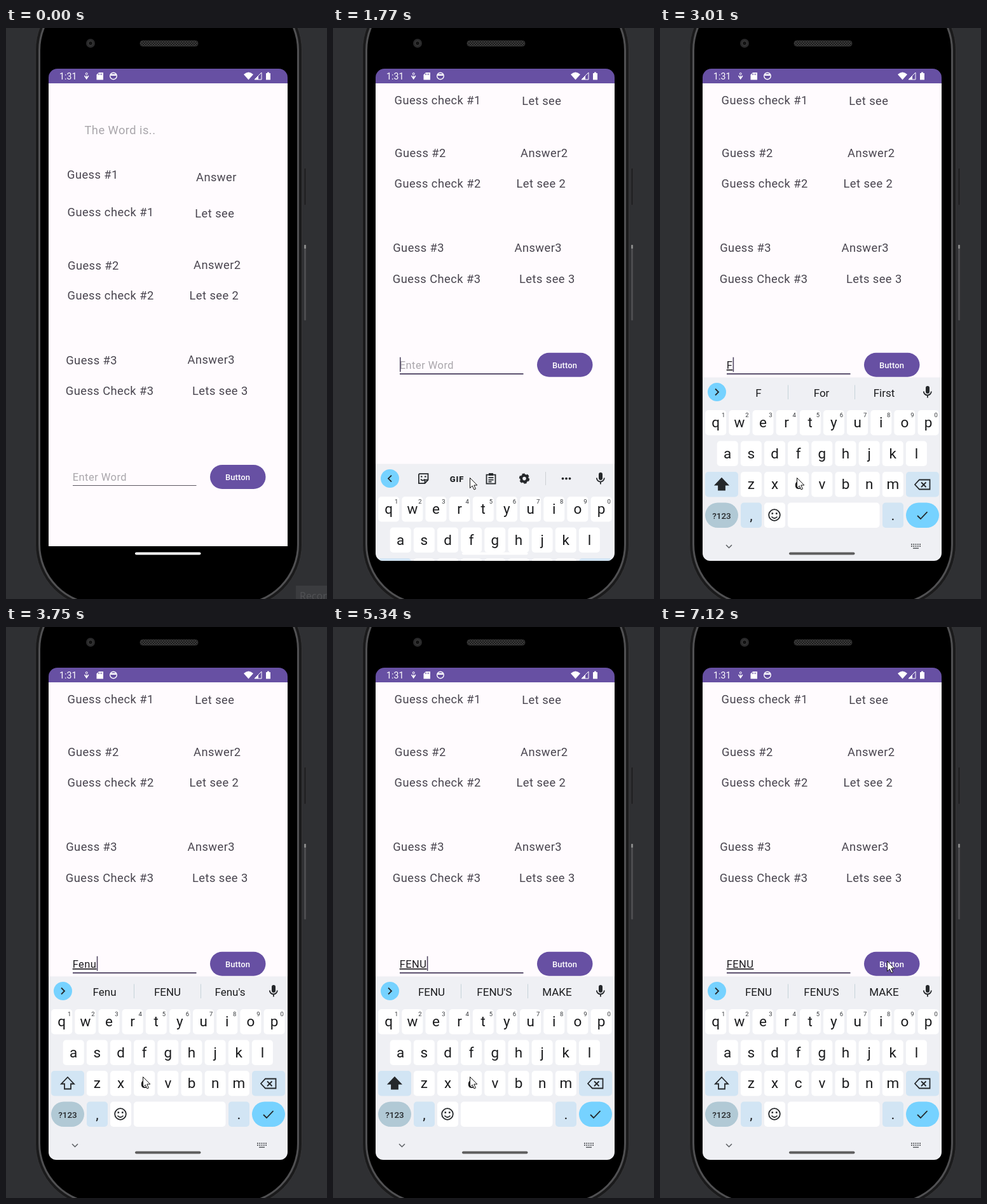
An HTML page for the animation above (8000 ms loop, 505x898 px).

```html
<!DOCTYPE html>
<html lang="en">
<head>
<meta charset="utf-8">
<title>Word guess app</title>
<style>
  html, body { margin: 0; width: 100%; height: 100%; overflow: hidden; background: #2f3033; }
  svg { display: block; width: 100%; height: 100%; }
  text { font-family: Roboto, sans-serif; white-space: pre; }
  .label { font-size: 18.3px; letter-spacing: .457px; fill: #49454f; }
  .field { font-size: 16.5px; letter-spacing: .457px; fill: #1c1b1f; }
  .label.hint, .field.hint { fill: #a9a6ab; }
  .key { font-size: 22.5px; fill: #1b1c1e; text-anchor: middle; }
  .digit { font-size: 9.5px; fill: #33363a; text-anchor: middle; }
  .word { font-size: 17px; fill: #1b1c1e; text-anchor: middle; }
  .line { fill: none; stroke: #25282b; stroke-width: 1.8; }
</style>
</head>
<body>
<svg viewBox="0 0 505 898">
  <defs>
    <clipPath id="screen"><path d="M67 78a14 14 0 0 1 14-14H429a14 14 0 0 1 14 14V826a12 12 0 0 1-12 12H79a12 12 0 0 1-12-12Z"/></clipPath>
    <clipPath id="page"><path d="M67 87H443V815H67Z"/></clipPath>
    <pattern id="mesh" width="4" height="4" patternUnits="userSpaceOnUse">
      <path d="M0 0L4 4M4 0L0 4" stroke="#444" stroke-width=".8"/>
    </pattern>
  </defs>

  <g id="tooltip">
    <path d="M456 877H505V898H456Z" fill="#3b3c3f"/>
    <text x="462" y="899" style="font:16px 'Open Sans',sans-serif" fill="#515255">Record</text>
  </g>

  <g id="phone">
    <rect x="468.500" y="220" width="4" height="59" rx="2" fill="#232325" stroke="#39393b" stroke-width=".7"/>
    <rect x="469" y="341" width="3" height="119" rx="1.500" fill="#4c4c4f"/>
    <rect x="469" y="341" width="3" height="6" rx="1" fill="#888"/>
    <rect x="46.500" y="-65" width="419" height="977" rx="100" fill="#1a1a1b" stroke="#353537"/>
    <rect x="52.500" y="-59" width="407" height="965" rx="94" fill="#000" stroke="#505052" stroke-width="3"/>
    <circle cx="133" cy="24" r="7" fill="#29292a"/>
    <circle cx="133" cy="24" r="3.5" fill="#111" stroke="#444"/>
    <rect x="211" y="20" width="91" height="8.5" rx="4" fill="#1b1b1b"/>
    <rect x="211" y="20" width="91" height="8.5" rx="4" fill="url(#mesh)" stroke="#333"/>
  </g>

  <g clip-path="url(#screen)">
    <path d="M67 87H443V815H67Z" fill="#fffbfe"/>
    <g clip-path="url(#page)">
      <g id="content">
        <g id="labels"></g>
        <path id="underline"/>
        <text id="entry" class="field" x="104.700" y="712.300"></text>
        <path id="caret" d="M0 694V717" stroke="#514863" stroke-width="1.6"/>
        <rect x="321" y="687" width="87.5" height="38" rx="19" fill="#6750a3"/>
        <text x="364.5" y="711" text-anchor="middle" font-size="13" font-weight="500" letter-spacing=".1" fill="#fff">Button</text>
      </g>
    </g>
    <path d="M67 64H443V87H67Z" fill="#6750a3"/>
    <g fill="#fff">
      <text x="84" y="81" font-size="14.2">1:31</text>
      <path d="M142.5 73.5L146 70H153V81.500H142.500Z"/>
      <path d="M145.500 71.500v2.500M148 71.500v2.500M150.500 71.500v2.500" stroke="#6750a3"/>
      <circle cx="169" cy="75.500" r="5.300" fill="none" stroke="#fff" stroke-width="1.400"/>
      <path d="M164.500 72.500h9v2.500h-9z"/>
      <path d="M123.500 75l3.200 5 3.200-5M126.700 75v4" fill="none" stroke="#fff" stroke-width="1.400"/>
      <circle cx="126.700" cy="72" r="1.500" fill="none" stroke="#fff"/>
      <path d="M374 73q7.500-7 15 0L381.500 81.500Z"/>
      <path d="M391 81L402 70V81Z" fill="none" stroke="#fff"/><path d="M391 81L397 75V81Z"/>
      <path d="M409 71h2v-1.500h3V71h2V81.500h-7Z"/>
    </g>

    <g id="keyboard">
      <path d="M67 549.5H443V840H67Z" fill="#eff0f4"/>
      <g id="keys"></g>
      <path id="shift" class="line" d="M97 708L107 718.500H102V726.500H92V718.500H87Z"/>
      <path class="line" d="M401 718L408 710.500H424.500V725.500H408ZM411 714.500l7.500 7.500M418.500 714.500l-7.500 7.500"/>
      <g class="line"><circle cx="180" cy="766" r="8.800"/><path d="M175.500 768.500q4.500 5 9 0"/></g>
      <path d="M175.500 763.500h2.600M182 763.500h2.600" stroke="#25282b" stroke-width="2.600"/>
      <path class="line" d="M405 767l5 5 10.500-11"/>
      <circle cx="89.500" cy="572.500" r="14.500" fill="#76d2ff"/>
      <path id="chevron" class="line" d="M92 567.500l-5 5 5 5"/>
      <rect x="418" y="563" width="6" height="12" rx="3" fill="#25282b"/>
      <path class="line" d="M414.800 571.500a6 6 0 0 0 12 0M420.900 577.500V581.500"/>

      <g id="toolbar">
        <path class="line" d="M136 565H149.500V574.500L144.500 580H135V566ZM149.500 574.500H144.500V580M138 573.500q3.500 4 6.500 0"/>
        <path d="M138 568.500h2.500v2h-2.500zM144 568.500h2.500v2h-2.500z" fill="#25282b"/>
        <text x="195" y="577.500" text-anchor="middle" font-size="13" font-weight="900" letter-spacing=".8" fill="#25282b">GIF</text>
        <path class="line" d="M241.500 566.500H255.500V580.500H241.500ZM244.500 571h8M244.500 574.500h8M244.500 577.500h5"/>
        <path d="M245 564h7v4h-7z" fill="#25282b"/>
        <circle cx="301" cy="572.500" r="4.800" fill="none" stroke="#25282b" stroke-width="4"/>
        <circle cx="301" cy="572.500" r="7" fill="none" stroke="#25282b" stroke-width="2.400" stroke-dasharray="4.200 3.130"/>
        <path d="M334.500 562V583" stroke="#cdd0d4"/>
        <path d="M361.500 572.500h.01M367 572.500h.01M372.500 572.500h.01" stroke="#25282b" stroke-width="3.800" stroke-linecap="round"/>
      </g>
      <g id="suggestions">
        <path d="M201.500 561.500V584M306.500 561.500V584" stroke="#c6d3d9"/>
        <text class="word" x="155" y="579.500"></text>
        <text class="word" x="254" y="579.500"></text>
        <text class="word" x="352.500" y="579.500"></text>
      </g>
      <path d="M104 813l4.500 4.500 4.500-4.500" fill="none" stroke="#5d6064" stroke-width="1.500"/>
      <path d="M395 812H410M395 815H410" stroke="#5d6064" stroke-width="1.800" stroke-dasharray="1.800 1.500"/>
      <path d="M398 818.300H407" stroke="#5d6064" stroke-width="1.500"/>
    </g>
    <rect id="handle" x="203" y="824.500" width="103.500" height="4" rx="2"/>
  </g>
  <path id="pointer" d="M.5 .5V16.500L4.200 13 7 19 9.500 17.900 6.800 12H11.800Z" fill="#fff" stroke="#111" stroke-linejoin="round"/>
</svg>

<script>
const LOOP = 8000;
const $ = id => document.getElementById(id);
const entry = $('entry');
const words = document.querySelectorAll('.word');

const LABELS = [
  ['The Word is..', 123.5, 166.5, 'hint'],
  ['Guess #1', 96, 236.5], ['Answer', 299, 241],
  ['Guess check #1', 96.5, 296], ['Let see', 297.3, 297.5],
  ['Guess #2', 97, 379.5], ['Answer2', 295, 379],
  ['Guess check #2', 96.5, 427], ['Let see 2', 288.5, 427],
  ['Guess #3', 94.2, 528.5], ['Answer3', 285.5, 528],
  ['Guess Check #3', 93.8, 577], ['Lets see 3', 293, 577],
];
$('labels').innerHTML = LABELS.map(([s, x, y, c = '']) =>
  `<text class="label ${c}" x="${x}" y="${y}">${s}</text>`).join('');

const key = (x, y, w, fill = '#fff', r = 5) =>
  `<rect x="${x}" y="${y}" width="${w}" height="39.5" rx="${r}" fill="${fill}"/>`;
const glyph = (s, x, y, cls = 'key') => `<text class="${cls}" x="${x}" y="${y}">${s}</text>`;
const PITCH = 37.15, BLUE = '#d2e5f4';
const letters = [['qwertyuiop', 87.7, 601], ['asdfghjkl', 106.2, 649.5], ['zxcvbnm', 143.4, 698]]
  .map(([row, x0, y], r) => [...row].map((c, i) => {
    const x = x0 + i * PITCH;
    return key(x - 16.5, y, 33) + glyph(c, x, y + 27) +
      (r ? '' : glyph((i + 1) % 10, x + 12, y + 11, 'digit'));
  }).join('')).join('');
$('keys').innerHTML = letters +
  key(71, 698, 52, BLUE) + key(387, 698, 52, BLUE) +
  key(71, 746.5, 52, '#b1c9d5', 19.75) + key(127, 746.5, 33, BLUE) + key(164, 746.5, 33) +
  key(201, 746.5, 144.5) + key(350, 746.5, 33, BLUE) + key(387, 746.5, 52, '#76d2ff', 19.75) +
  '<text x="97" y="772" text-anchor="middle" font-size="13.5" font-weight="500" fill="#25282b">?123</text>' +
  glyph(',', 143.5, 774) + glyph('.', 366.5, 774);

// time, typed text, suggestions
const TYPING = [
  [0, ''],
  [3010, 'F', 'F For First'], [3280, 'Fe', 'Fe Feel Few'],
  [3490, 'Fen', 'Fen Fence Fend'], [3550, 'Fenu', 'Fen Fence Fend'],
  [3750, 'Fenu', "Fenu FENU Fenu's"],
  [4250, 'Fen', 'Fen Fence Fend'], [4320, 'Fe', 'Fe Feel Few'],
  [4390, 'F', 'F For First'], [4460, ''],
  [5000, 'F', 'F FOR FIRST'], [5130, 'FE', 'FE FEEL FEW'],
  [5260, 'FEN', 'FEN FENCE FEND'], [5340, 'FENU', "FENU FENU'S MAKE"],
];
const CARET_ON = [[1370, 1970], [2520, 4080], [4180, 4950], [5000, 5890], [6380, 6880]];
const SHIFT_ON = [[3010, 3210], [5000, 5410]];
const POINTER = [
  [70, 451, 886], [820, 233, 715], [890, 229, 713], [1170, 215, 707],
  [5890, 215, 707], [6170, 399, 522], [6240, 399, 522],
  [6640, 364, 506], [6710, 363, 508], [7120, 357, 525],
];

const clamp = v => Math.min(1, Math.max(0, v));
const smooth = v => v * v * (3 - 2 * v);
const within = (spans, t) => spans.some(([a, b]) => t >= a && t < b);
const show = (el, on) => el.setAttribute('visibility', on ? 'visible' : 'hidden');

function pointerAt(t) {
  const i = POINTER.findIndex(p => p[0] > t);
  if (i < 1) return POINTER.at(i).slice(1);
  const [t0, x0, y0] = POINTER[i - 1], [t1, x1, y1] = POINTER[i];
  const k = smooth((t - t0) / (t1 - t0));
  return [x0 + (x1 - x0) * k, y0 + (y1 - y0) * k];
}

function draw(t) {
  const [, typed, hints] = TYPING.findLast(s => s[0] <= t);
  const focused = t >= 1370;

  show($('tooltip'), t < 70);
  show($('pointer'), t >= 70);
  $('pointer').setAttribute('transform', `translate(${pointerAt(t)})`);

  $('content').setAttribute('transform', `translate(0 ${t < 1700 ? 0 : -176.3})`);
  $('underline').setAttribute('d', `M105 ${focused ? 720.3 : 719.5}H299.5`);
  $('underline').setAttribute('stroke', focused ? '#5d5270' : '#5c5861');
  $('underline').setAttribute('stroke-width', focused ? 2 : 1);
  entry.textContent = typed || 'Enter Word';
  entry.setAttribute('class', typed ? 'field' : 'field hint');
  entry.setAttribute('text-decoration', typed ? 'underline' : 'none');
  const caretX = 105.8 + (typed ? entry.getComputedTextLength() : 0);
  $('caret').setAttribute('transform', `translate(${caretX})`);
  show($('caret'), within(CARET_ON, t));

  const slide = 289 * (1 - clamp((t - 1680) / 290)) ** 2;
  $('keyboard').setAttribute('transform', `translate(0 ${slide})`);
  show($('keyboard'), t >= 1700);
  show($('toolbar'), t >= 1700 && !typed);
  show($('suggestions'), typed);
  $('chevron').setAttribute('transform', typed ? 'rotate(180 89.5 572.5)' : '');
  $('shift').style.fill = within(SHIFT_ON, t) ? '#25282b' : 'none';
  if (hints) hints.split(' ').forEach((s, i) => words[i].textContent = s);

  const shade = t < 2110 ? 255 : 197 - 103 * clamp((t - 2110) / 690);
  $('handle').setAttribute('fill', `rgb(${shade},${shade},${shade})`);
}

function tick() {
  draw(performance.now() % LOOP);
  requestAnimationFrame(tick);
}
tick();
</script>
</body>
</html>
```
